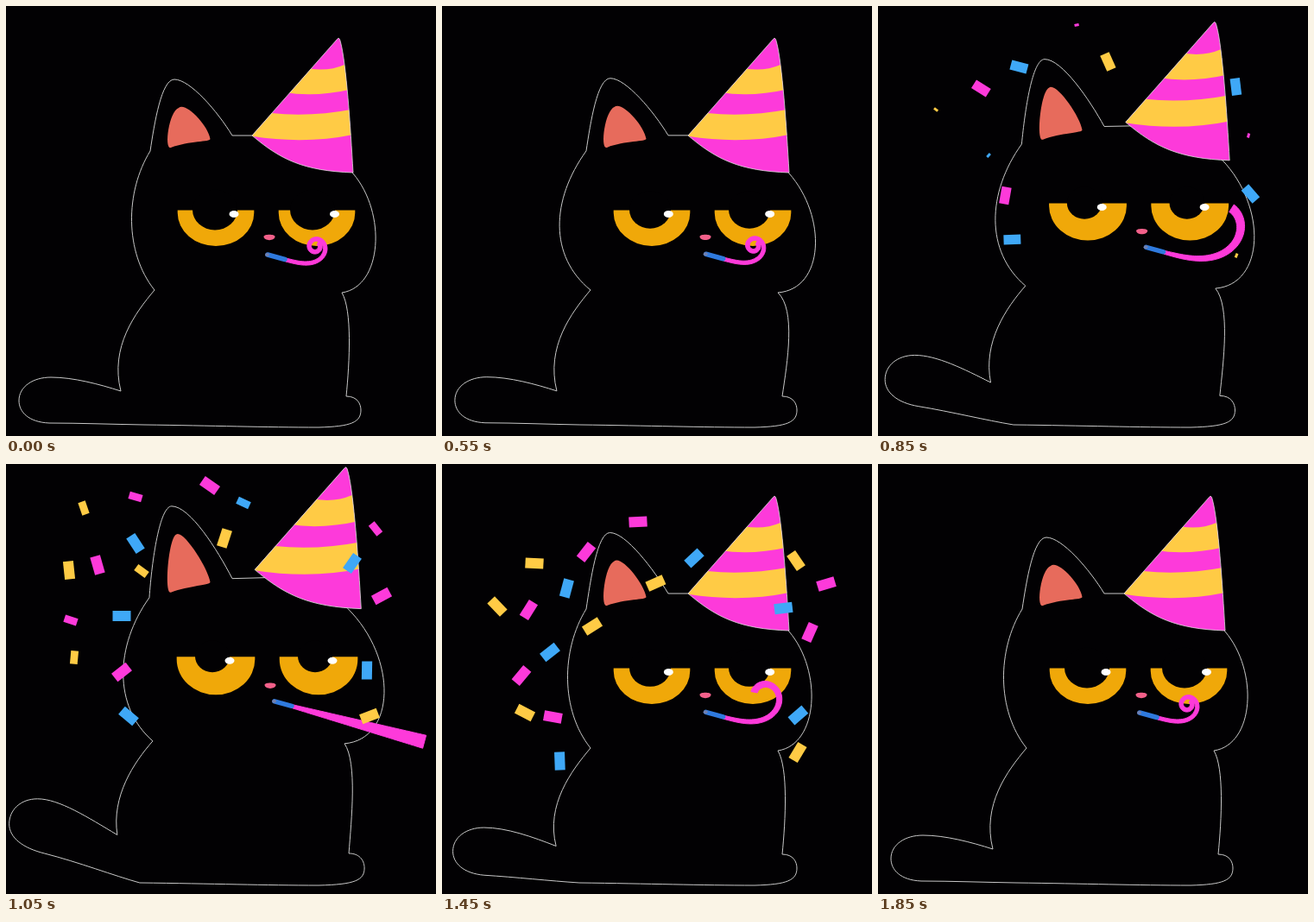
Write an HTML page that moves like this. It is 498 by 498 pixels and loops after 1.9 s.

```html
<!DOCTYPE html>
<html lang="en">
<head>
<meta charset="utf-8">
<title>Party cat</title>
<style>
  html, body { margin: 0; width: 100%; height: 100%; overflow: hidden; background: #020103; }
  svg { display: block; width: 100vw; height: 100vh; }
</style>
</head>
<body>
<svg viewBox="0 0 498 498">
  <defs>
    <path id="cone" d="M383.500 38.500Q386 35 387.500 42C394 66 399 140 402 193C345 191 318 178 285 150Z"/>
    <clipPath id="coneClip"><use href="#cone"/></clipPath>
  </defs>
  <path id="body" fill="#020103" stroke="#c8c8c8" stroke-linejoin="round"/>
  <path id="ear" fill="#e76b5c"/>
  <g id="hat">
    <use href="#cone" fill="#fd3ada"/>
    <g clip-path="url(#coneClip)" fill="#ffcb45">
      <path d="M340 70L351 72.500Q374 76 392 68L400 96.500Q358 106 322 100Z"/>
      <path d="M300 123L307 124Q352 129 402 119.500L404 148.500Q345 161 280 150Z"/>
    </g>
    <use href="#cone" fill="none" stroke="#ddd" stroke-width=".8"/>
  </g>
  <path id="eyes" fill="#f0a809"/>
  <g id="pupils" fill="#020103"><ellipse/><ellipse/></g>
  <g id="glints" fill="#fff"><ellipse rx="5.500" ry="4"/><ellipse rx="5.500" ry="4"/></g>
  <path id="nose" fill="#f2608a"/>
  <path id="horn" fill="#fd3ada" stroke="#fd3ada" stroke-linejoin="round"/>
  <path id="pipe" fill="none" stroke="#2f7ade" stroke-width="5.500" stroke-linecap="round"/>
  <ellipse id="pipeEnd" rx="2.500" ry="2" fill="#6f7fb0"/>
  <g id="confetti"></g>
</svg>
<script>
const LOOP = 1900, STEP = 50;
const $ = id => document.getElementById(id);
const set = (el, attrs) => { for (const k in attrs) el.setAttribute(k, attrs[k]); };

const ramp = (t, from, to) => Math.min(1, Math.max(0, (t - from) / (to - from)));
const ease = (t, from, to) => { const k = ramp(t, from, to); return k * k * (3 - 2 * k); };
// Rises from a to b, holds, then falls from c to d.
const swell = (t, a, b, c, d) => ease(t, a, b) - ease(t, c, d);

function poseAt(t) {
  const lift = 1.05 * swell(t, 520, 1110, 1210, 1450);
  const calm = ramp(t, 0, 550) - ramp(t, 1450, 1850);
  return {
    lift,
    hat: 1.1 * swell(t, 550, 1125, 1200, 1450),
    ear: 1.06 * swell(t, 480, 1110, 1200, 1530),
    tail: 1.06 * swell(t, 520, 1110, 1110, 1590),
    puff: ramp(t, 0, 550) - ramp(t, 1200, 1450),
    focus: Math.min(1, .33 * calm + lift),
    unroll: swell(t, 520, 1040, 1250, 1645)
  };
}

function drawBody({ lift: l, ear: e, tail: w, puff: p }) {
  const tip = 85 - 35 * e, brow = 168 - 13 * l, paw = 411 + 4 * l;
  const tailLeft = 15 - 11 * w, tailTop = 430 - 41 * w;
  set($('body'), { d: `M${167 - l} ${brow}
    C${172 - 3 * l} ${135 - 23 * l} ${180 - 2 * e} ${tip} ${195 - 3 * e} ${tip}
    C213 ${tip} 245 ${122 - 22 * l} 262 ${150 - 17 * l}
    L${285 + 15 * l} ${150 - 18 * l}
    C${340 + 5 * l} ${152 - 17 * l} ${380 - 5 * l} ${165 - 20 * l} ${402 - 6 * l} ${194 - 26 * l}
    C${441 + 5 * p + 8 * l} ${240 + 4 * p - 18 * l} ${436 + 7 * p + 8 * l} ${325 + 3 * p - 9 * l} ${389 + 3 * l} ${332 - 8 * l}
    C${401 + 9 * p - 3 * l} ${352 - 6 * l} ${398 + 2 * p} 412 ${394 + 3 * l} ${452 - l}
    C${paw - 4} ${452 - l} ${paw} 461 ${paw} 468
    C${paw} 482 ${paw - 11} 487 362 488
    C300 488 240 486 ${160 - 5 * w} 485
    C125 ${484.5 - 7.5 * w} 85 ${483 - 21 * w} ${50 - 5 * w} ${483 - 31 * w}
    C${26 - 6 * w} ${482 - 36 * w} ${tailLeft} ${470 - 36 * w} ${tailLeft} ${457 - 39 * w}
    C${tailLeft} ${441 - 39 * w} ${31 - 14 * w} ${tailTop} ${52 - 15 * w} ${tailTop}
    C${78 - 16 * w} ${tailTop} ${108 - 13 * w} ${438 - 28 * w} ${133 - 4 * w} ${446 - 16 * w}
    C${120 + 2 * l} ${395 - 10 * l} ${150 - 2 * l} ${355 - 9 * l} ${172 - 2 * l} ${329 - 8 * l}
    C${137 - 13 * p} ${285 + 5 * p - 9 * l} ${138 - 12 * p} ${215 + 10 * p - 14 * l} ${167 - l} ${brow}Z` });

  const top = 118 - 35 * e, base = 164 - 15 * l, right = 154 - 17 * l;
  set($('ear'), { d: `M191 ${base} C183 ${base + 3} 188 ${top + 5} ${200 - 3 * e} ${top}
    C${208 - 3 * e} ${top - 7} 234 ${right - 16} 236.5 ${right}
    C237 ${right + 3.5} 212 ${base - 8} 191 ${base}Z` });
}

function drawFace({ lift: l, focus: f }) {
  const top = 236.5 - 13 * l, rx = 44.3 + l, ry = 38.5 + 2.5 * l;
  const eye = x => `M${x - rx} ${top}v3a${rx} ${ry} 0 0 0 ${2 * rx} 0v-3Z`;
  set($('eyes'), { d: eye(243) + eye(360 + 2 * l) });
  [242 - 3 * f, 355 + 3 * f].forEach((cx, i) =>
    set($('pupils').children[i], { cx, cy: top - .5, rx: 26 - 6 * f, ry: 23.5 - 5 * f }));
  [264 - 5 * f, 380.5 - 2.5 * f].forEach((cx, i) =>
    set($('glints').children[i], { cx, cy: top + 4.5 }));
  set($('nose'), { d: `M${298.5 + l} ${267 - 11 * l}c0 -3 13 -3 13 0c0 5.5 -13 5.5 -13 0Z` });
}

function drawHat({ hat: h }) {
  set($('hat'), { transform: `translate(${385 + 8 * h} ${37 - 32 * h}) scale(${1 + .05 * h}) translate(-385 -37)` });
}

// The blower is a ribbon whose heading turns along its length.
function drawHorn({ lift, focus, unroll }) {
  const x0 = 302 + 8 * focus, y0 = 288 - 11 * lift - 2 * focus, n = 60;
  const stretch = unroll * unroll;
  const turn = 534 * (1 - unroll), length = 110 + 48 * stretch;
  const power = 2.3 - .4 * unroll, flare = 1 + 10.5 * stretch;
  const left = [], right = [];
  let x = x0 + 22, y = y0 + 6;
  for (let i = 0; i <= n; i++) {
    const s = i / n, a = (14 + lift - turn * s ** power) * Math.PI / 180;
    const half = 2 + flare * s / 2;
    const dx = Math.sin(a) * half, dy = Math.cos(a) * half;
    left.push(`${x + dx} ${y - dy}`);
    right.unshift(`${x - dx} ${y + dy}`);
    x += Math.cos(a) * length / n;
    y += Math.sin(a) * length / n;
  }
  set($('horn'), { d: `M${left.concat(right).join('L')}Z` });
  set($('pipe'), { d: `M${x0 + 1} ${y0}l20 5.5` });
  set($('pipeEnd'), { cx: x0 + .5, cy: y0 });
}

// Three bursts of paper: each swings sideways, drifts, falls and spins by its own rates.
const colors = { p: '#fd3ada', b: '#3fa8f7', y: '#ffcb45' };
const bursts = [
  { hues: 'bbpbybp', spots: '142,292 150,92 106,117 418,239 253,86 401,115 134,241',
    angle: i => 40 + 17 * i, swing: 5.3, drift: -2.8, fall: 23, pull: 1.5, spin: 36, twist: -6 },
  { hues: 'pybpy', spots: '435,153 421,292 134,176 236,25 73,123',
    angle: i => 152 + 7 * i * i, swing: -5.2, drift: -4.5, fall: 9, pull: 6, spin: 55, twist: 8 },
  { hues: 'ppbypyyy', spots: '150,38 75,181 275,45 157,124 428,75 90,51 79,224 393,48',
    angle: i => 16 + 2.2 * i * i, swing: -4.8, drift: 8.5, fall: 29, pull: 1.5, spin: -54, twist: 10 }
];
const pieces = bursts.flatMap((burst, b) => burst.spots.split(' ').map((spot, i) => {
  const [x, y] = spot.split(',').map(Number);
  const el = document.createElementNS('http://www.w3.org/2000/svg', 'rect');
  set(el, { x: -10.5, y: -6, width: 21, height: 12, fill: colors[burst.hues[i]] });
  $('confetti').append(el);
  return { el, burst, x, y, angle: burst.angle(i), birth: 690 + 118 * b };
}));

function drawConfetti(t) {
  const u = (t - 1050) / 200;
  for (const { el, burst: b, x, y, angle, birth } of pieces) {
    const size = ramp(t, birth, birth + 170) * (1 - ramp(t, 1540, 1710));
    const px = x + b.swing * (1 - Math.cos(Math.PI * u)) + b.drift * u;
    const py = y + b.fall * u + b.pull * u * u;
    const turn = angle + b.spin * u + b.twist * u * u;
    set(el, {
      visibility: size > 0 ? 'visible' : 'hidden',
      transform: `translate(${px} ${py}) rotate(${turn}) scale(${size})`
    });
  }
}

function draw(t) {
  const pose = poseAt(t);
  drawBody(pose);
  drawHat(pose);
  drawFace(pose);
  drawHorn(pose);
  drawConfetti(t);
}

let start;
function tick(now) {
  start ??= now;
  draw(Math.floor(Math.max(0, now - start) / STEP) * STEP % LOOP);
  requestAnimationFrame(tick);
}
draw(0);
requestAnimationFrame(tick);
</script>
</body>
</html>
```
